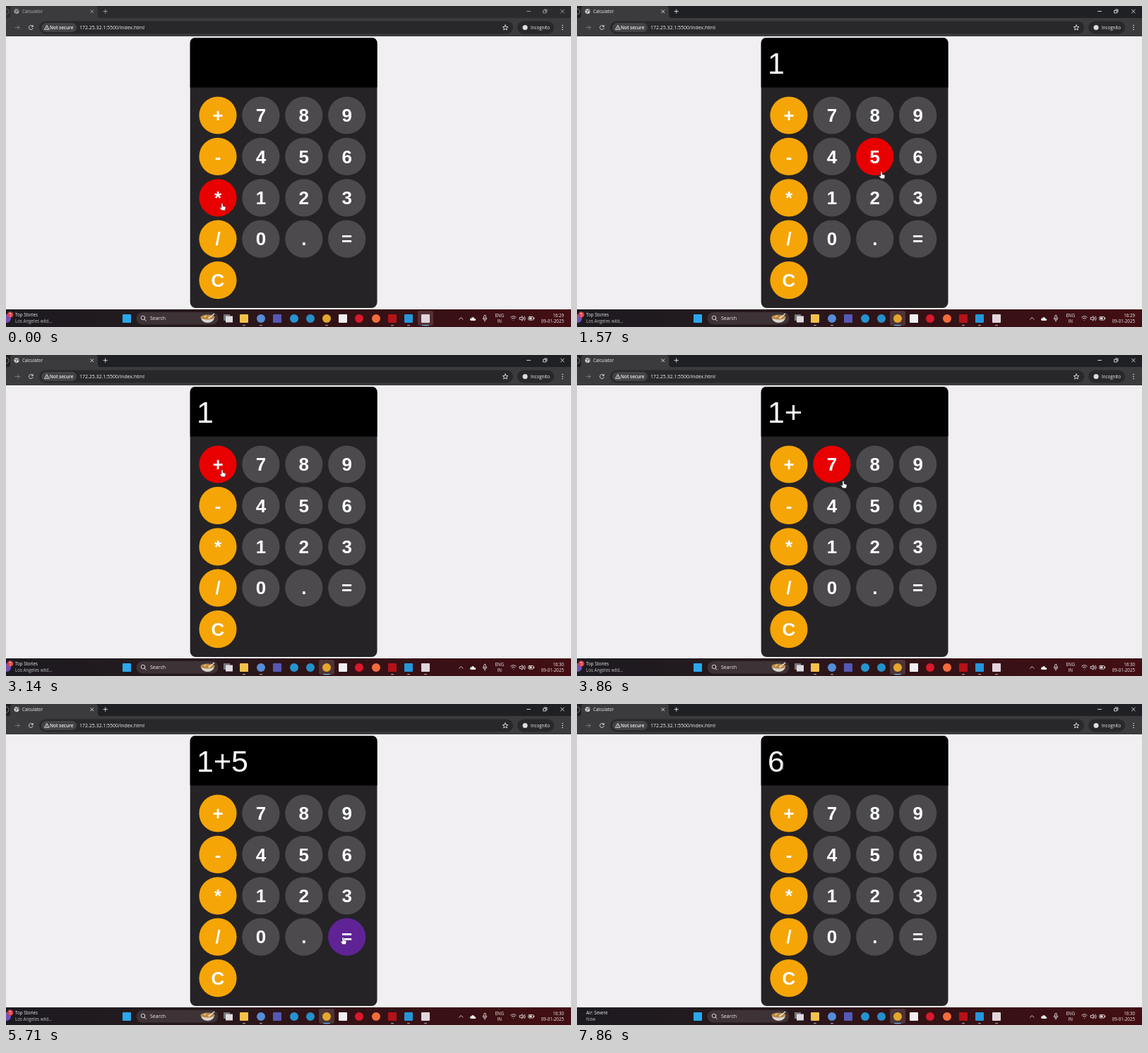
Animation of 800 by 455 pixels, one loop 8 s. Source, as an HTML page:

```html
<!DOCTYPE html>
<html lang="en">
<head>
<meta charset="utf-8">
<title>Calculator</title>
<style>
  html, body { margin: 0; width: 100%; height: 100%; overflow: hidden; background: #f1eff2; }
  svg { display: block; width: 100vw; height: 100vh; }
  text { font-family: "Open Sans", "Noto Sans", sans-serif; font-size: 6.2px; fill: #f2f0f1; }
  .key text { font: bold 26px "Liberation Sans", Arial, sans-serif; fill: #fff; text-anchor: middle; }
  #display { font: 43px "Liberation Sans", Arial, sans-serif; fill: #fff; }
  .line { fill: none; stroke: #e4e2e4; stroke-width: .9; stroke-linecap: round; stroke-linejoin: round; }
  .right { text-anchor: end; }
  .mid { text-anchor: middle; }
</style>
</head>
<body>
<svg viewBox="0 0 800 455" preserveAspectRatio="none">
  <defs>
    <linearGradient id="barFill">
      <stop offset="0" stop-color="#1c1a20"/>
      <stop offset=".25" stop-color="#231a1e"/>
      <stop offset=".6" stop-color="#321216"/>
      <stop offset="1" stop-color="#420e13"/>
    </linearGradient>
  </defs>

  <!-- Browser window -->
  <rect width="800" height="455" fill="#f1eff2"/>
  <rect id="strip" width="800" height="20" fill="#1f2023"/>
  <path d="M0 17H3Q6 17 6 13V4Q6 0 10 0H126Q130 0 130 4V13Q130 17 134 17H800V43H0Z" fill="#3b3b3e"/>
  <g id="chrome">
    <path class="line" d="M0 4Q4 4 4 8T0 12" opacity=".5"/>
    <circle cx="15" cy="7.6" r="3.5" fill="#d8d7d9"/>
    <path d="M12.5 6l3 1-1 2-1 1M15 4.5l2 1.5 1 2" fill="none" stroke="#4b4b4e"/>
    <text x="23" y="10">Calculator</text>
    <path class="line" d="M119.8 5.7l4 4m0-4l-4 4M138 7.6h5.4m-2.7-2.7v5.4"/>
    <path class="line" d="M737.5 7.5h5M761 6.3h3.6v3.6h-3.6zM762.3 5h3.6v3.6M785.5 5.2l4.6 4.6m0-4.6l-4.6 4.6"/>
  </g>
  <rect x="47" y="21.5" width="671" height="18" rx="9" fill="#28282b"/>
  <rect x="50" y="24" width="50" height="13" rx="6.5" fill="#434346"/>
  <rect x="724" y="21.5" width="52" height="18" rx="9" fill="#28282b"/>
  <path class="line" d="M13 30.5h6m-2.6-2.6l2.6 2.6-2.6 2.6" opacity=".4"/>
  <path class="line" d="M37.8 28.7A3 3 0 1 0 38.2 31.5M38.2 27.3v2h-2"/>
  <path class="line" d="M58 27.5l3.2 5.8h-6.4zM58 29.7v1.5M58 32.3v.1" stroke-width=".7"/>
  <text x="62" y="32.8" font-weight="600" style="font-size:6.4px">Not secure</text>
  <text x="104" y="33" style="font-size:6.95px">172.25.32.1:5500/index.html</text>
  <path class="line" d="M707 26.9l1.1 2.5 2.7.2-2.1 1.7.7 2.7-2.4-1.5-2.4 1.5.7-2.7-2.1-1.7 2.7-.2z"/>
  <circle cx="735" cy="30.5" r="3.5" fill="#dedce0"/>
  <text x="743" y="32.8">Incognito</text>
  <g fill="#e4e2e4"><circle cx="788" cy="27.5" r=".8"/><circle cx="788" cy="30.5" r=".8"/><circle cx="788" cy="33.5" r=".8"/></g>

  <!-- Calculator -->
  <rect x="260.7" y="45" width="264.8" height="383" rx="8" fill="#252326"/>
  <path d="M260.7 115.5V53q0-8 8-8h248.8q8 0 8 8v62.5z" fill="#000"/>
  <text id="display" x="270" y="96"></text>
  <g id="keys"></g>

  <!-- Taskbar -->
  <rect y="430" width="800" height="25" fill="url(#barFill)"/>
  <g id="badge">
    <circle cx="1" cy="443" r="6" fill="#7251b5"/>
    <circle cx="6" cy="437.5" r="4.3" fill="#d83b47"/>
    <text class="mid" x="6" y="439.8">5</text>
  </g>
  <text id="news" x="13" y="440.3" font-weight="500"></text>
  <text id="detail" x="13" y="449.2" fill-opacity=".78"></text>
  <rect x="184.5" y="434" width="116" height="17.5" rx="8.7" fill="#3d3236"/>
  <circle class="line" cx="194" cy="442" r="2.8"/><path class="line" d="M196.1 444.1l2.2 2.4"/>
  <text x="204" y="445.3" style="font-size:7px">Search</text>
  <path d="M275.5 441h20q-2 8-10 8t-10-8z" fill="#d9d4cb"/>
  <ellipse cx="285.5" cy="441" rx="10" ry="3.4" fill="#b98542"/>
  <path d="M280 441l4-2m2 3l3-2" stroke="#e5c584" stroke-width="1.5"/>
  <path d="M287 443l8-7" stroke="#eee" stroke-width="1.3"/>
  <rect id="focus" y="432" width="22" height="21" rx="3" fill="#fff" opacity=".14"/>
  <rect x="308" y="437" width="9" height="9" fill="#77747a"/>
  <rect x="311" y="439.5" width="10" height="9" fill="#dedbe0"/>
  <g id="apps"></g>
  <path class="line" d="M641.6 444.2l2.7-2.7 2.7 2.7"/>
  <path d="M658.5 446q-2-.4-1.5-2.2.6-1.3 2-1.2 1-2.4 3.2-1.2.8.4 1 1.5 2.3.1 2.1 1.8-.2 1.3-1.5 1.3z" fill="#eee"/>
  <rect class="line" x="676.7" y="438.3" width="2.6" height="5" rx="1.3"/>
  <path class="line" d="M675.2 442.3q.3 2.9 2.8 2.9t2.8-2.9M678 445.4v1.8" stroke-width=".7"/>
  <text class="mid" x="698.7" y="440.6">ENG</text>
  <text class="mid" x="698.7" y="449.3">IN</text>
  <path class="line" d="M714.7 441.2q3.7-3.2 7.4 0M716.2 443q2.2-1.9 4.4 0M718.4 445.2v.1"/>
  <path class="line" d="M727.5 441.5h1.5l2-1.8v6.4l-2-1.8h-1.5zM732.5 441.3q1.2 1.6 0 3.2M734.2 440q2.2 2.9 0 5.8"/>
  <rect class="line" x="739.8" y="440.5" width="7" height="4.6" rx="1"/>
  <path d="M741 441.5h3.5v2.6H741zM747 441.8h1.2v2H747z" fill="#eee"/>
  <text id="clock" class="right" x="790" y="440.6"></text>
  <text class="right" x="790" y="449.3">09-01-2025</text>

  <!-- Pointer shapes, hot spot at 0,0 -->
  <g id="pointer">
    <path id="hand" d="M-1 0Q0-1 1 0V3.6L4.4 4.6Q5.2 5 5 6.2L4.2 9.7H-.6L-3.2 6.2Q-3.2 5-2 5.4L-1 6.2Z" fill="#fff" stroke="#222" stroke-width=".5"/>
    <path id="arrow" d="M0 0V7.2L1.7 5.7 2.8 8.2 4 7.7 3 5.2H5.2Z" fill="#fff" stroke="#222" stroke-width=".5"/>
    <path id="beam" d="M-1.7-4Q0-4 0-3 0-4 1.7-4M0-3V3M-1.7 4Q0 4 0 3 0 4 1.7 4" fill="none" stroke="#8a8a8a" stroke-width=".8"/>
  </g>
</svg>
<script>
const $ = id => document.getElementById(id);
const LOOP = 8000, STEPS_PER_MS = 7 / 1000;

function add(parent, tag, attrs, text = '') {
  const node = document.createElementNS(parent.namespaceURI, tag);
  for (const name in attrs) node.setAttribute(name, attrs[name]);
  node.textContent = text;
  return parent.appendChild(node);
}

const keys = ['+789', '-456', '*123', '/0.=', 'C'].flatMap((row, r) =>
  [...row].map((label, c) => {
    const x = 300 + c * 60.9, y = 155 + r * 58.4;
    const group = add($('keys'), 'g', { class: 'key' });
    const disc = add(group, 'circle', { cx: x, cy: y, r: 26.6 });
    add(group, 'text', { x, y: y + 9.2 }, label);
    return { label, x, y, disc, color: c ? '#4c4a4d' : '#f5a506' };
  }));

const apps = [
  [171, '#2ba7ec', 'square'], [337, '#f2c14b', 'square', 1], [361, '#568cd8', 'round', 1],
  [384, '#5558b5', 'square'], [408, '#2594d2', 'round'], [431, '#2490c8', 'round'],
  [454, '#e4a72d', 'round', 1], [477, '#f0eef0', 'square'], [500, '#d9182c', 'round'],
  [524, '#f46b3c', 'round'], [547, '#b51218', 'square', 1], [570, '#2596da', 'square', 1],
  [594, '#e2d5dc', 'square', 1]
];
for (const [x, fill, shape, running] of apps) {
  add($('apps'), 'rect', { x: x - 6, y: 437, width: 12, height: 12, rx: shape === 'round' ? 6 : 1, fill });
  if (running) add($('apps'), 'rect', { x: x - 2, y: 452, width: 4, height: 1.2, rx: .6, fill: '#a99da3' });
}
const focusLine = add($('apps'), 'rect', { y: 452, width: 10, height: 1.3, rx: .6, fill: '#62b5e8' });

// Pointer route: step, x, y
const route = [
  [0, 306, 280], [5, 366, 278], [9, 366, 278], [11, 431, 235], [12, 426, 216],
  [15, 365, 200], [18, 310, 183], [20, 306, 163], [25, 306, 163], [27, 377, 179],
  [30, 431, 233], [34, 431, 233], [39, 477, 331], [42, 477, 331], [43, 479, 329],
  [45, 479, 329], [50, 390, 190], [53, 303, 98], [55, 291, 88]
];
const presses = { 7: '1', 23: '+', 31: '5', 40: '=' };
const readout = [[0, ''], [8, '1'], [24, '1+'], [32, '1+5'], [41, '6']];

function pointerAt(step) {
  const next = route.findIndex(point => point[0] >= step);
  if (next <= 0) return route[0].slice(1);
  const [s0, x0, y0] = route[next - 1], [s1, x1, y1] = route[next];
  const k = (step - s0) / (s1 - s0);
  return [x0 + (x1 - x0) * k, y0 + (y1 - y0) * k];
}

function draw(step) {
  const [x, y] = pointerAt(step);
  const hovered = keys.find(key => Math.hypot(x - key.x, y - key.y) < 29);
  for (const key of keys) {
    const color = key !== hovered ? key.color : presses[step] === key.label ? '#5f2396' : '#e80000';
    key.disc.setAttribute('fill', color);
  }
  const shape = hovered ? 'hand' : y < 115 ? 'beam' : 'arrow';
  for (const id of ['hand', 'arrow', 'beam']) $(id).style.display = id === shape ? '' : 'none';
  $('pointer').setAttribute('transform', `translate(${x} ${y})`);
  $('display').textContent = readout.findLast(entry => entry[0] <= step)[1];

  const active = step >= 7, focusX = active ? 454 : 594;
  $('strip').setAttribute('fill', active ? '#1f2023' : '#2b2b2e');
  $('chrome').setAttribute('opacity', active ? 1 : .65);
  $('focus').setAttribute('x', focusX - 11);
  focusLine.setAttribute('x', focusX - 5);

  const weather = step >= 54;
  $('badge').style.display = weather ? 'none' : '';
  $('news').textContent = weather ? 'Air: Severe' : 'Top Stories';
  $('detail').textContent = weather ? 'Now' : 'Los Angeles wild...';
  $('clock').textContent = step < 14 ? '16:29' : '16:30';
}

let shown = -1;
function tick() {
  const step = Math.min(55, Math.floor((performance.now() % LOOP) * STEPS_PER_MS + .05));
  if (step !== shown) draw(shown = step);
  requestAnimationFrame(tick);
}
tick();
</script>
</body>
</html>
```
